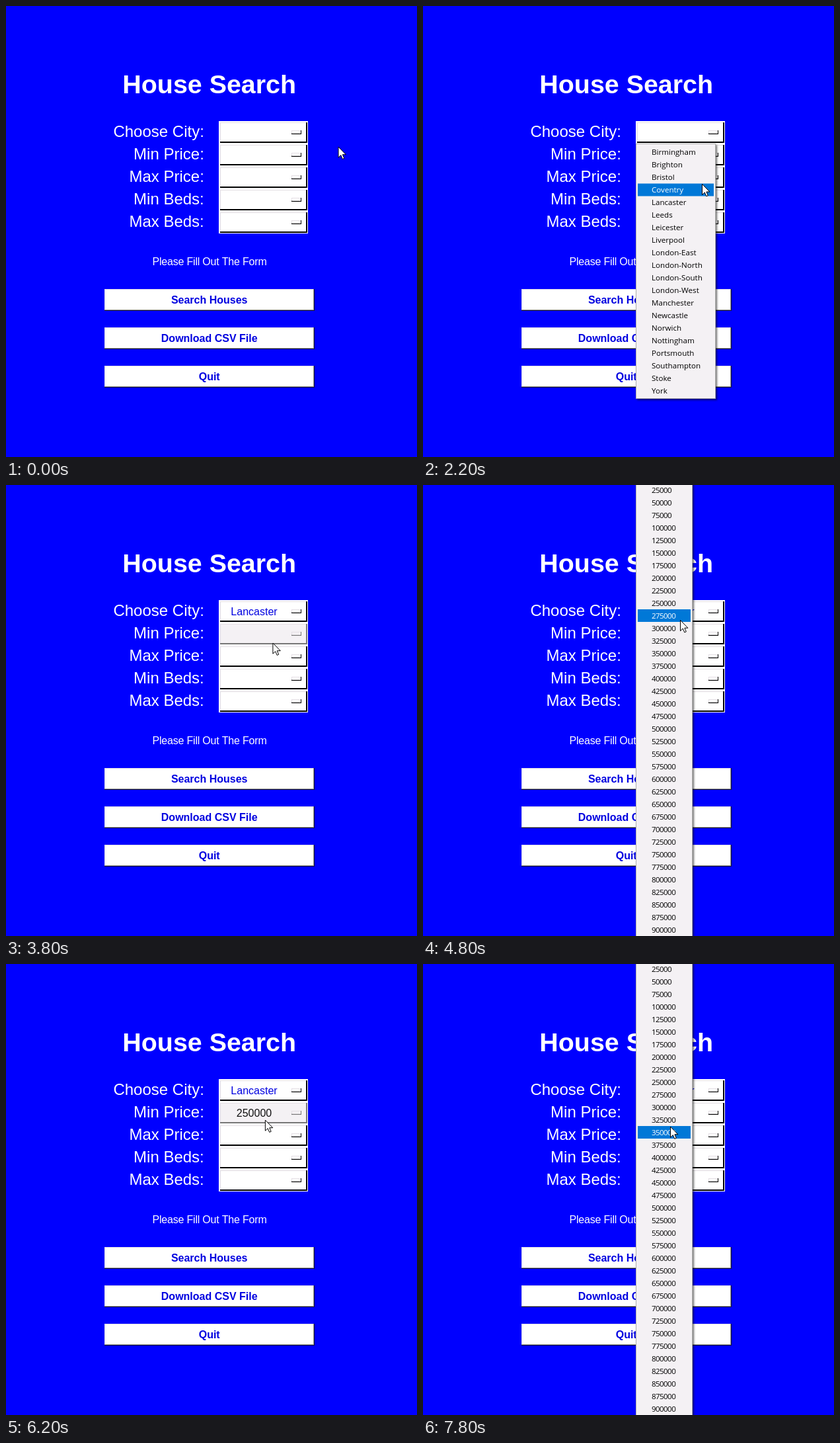
An HTML page that plays this animation: 622 px wide and 682 px high, repeating every 8000 ms.

```html
<!DOCTYPE html>
<html lang="en">
<head>
<meta charset="utf-8">
<title>House Search</title>
<style>
  html, body { margin: 0; width: 100%; height: 100%; overflow: hidden; background: #00f; }
  svg { display: block; width: 622px; height: 682px; font-family: "Liberation Sans", Arial, sans-serif; font-kerning: none; cursor: default; }
  .title { font-size: 39.4px; font-weight: bold; fill: #fff; text-anchor: middle; }
  .label { font-size: 24px; fill: #fff; text-anchor: end; }
  .status { font-size: 16px; letter-spacing: -.2px; fill: #fff; text-anchor: middle; }
  .button { font-size: 16px; font-weight: bold; fill: #0000e0; text-anchor: middle; }
  .value { font-size: 16px; fill: #0000e0; text-anchor: middle; }
  .face { fill: #fff; }
  .edge { fill: #000; }
  .hover .face { fill: #f4f1f4; }
  .hover .edge { fill: #777; }
  .hover .value { fill: #111; }
  .panel { fill: #f4f1f4; stroke: #b0b0b0; filter: drop-shadow(2px 2px 1.5px rgba(0, 0, 0, .55)); }
  .item { font: 11.6px "Open Sans", "Noto Sans", sans-serif; fill: #000; }
  .digits { letter-spacing: -.6px; }
  .bar { fill: none; }
  .active .bar { fill: #0078d7; }
  .active .item { fill: #fff; }
</style>
</head>
<body>
<svg id="stage" viewBox="0 0 622 682"></svg>
<script>
const STEP = 200, STEPS = 40, ROW = 34, ITEM = 19;
const stage = document.getElementById('stage');

function add(parent, tag, attrs, content) {
  const el = document.createElementNS('http://www.w3.org/2000/svg', tag);
  for (const name in attrs) el.setAttribute(name, attrs[name]);
  if (content) el.textContent = content;
  return parent.appendChild(el);
}
const rect = (parent, x, y, width, height, attrs) =>
  add(parent, 'rect', { x, y, width, height, ...attrs });
const text = (parent, x, y, cls, content) =>
  add(parent, 'text', { x, y, class: cls }, content);
const show = (el, on) => { el.style.display = on ? '' : 'none'; };

text(stage, 307.7, 132, 'title', 'House Search');
text(stage, 308, 392, 'status', 'Please Fill Out The Form');

['Search Houses', 'Download CSV File', 'Quit'].forEach((name, i) => {
  const y = 428 + 58 * i;
  rect(stage, 149, y, 318, 33, { fill: '#101030' });
  rect(stage, 149, y, 317, 32, { fill: '#a0a0a0' });
  rect(stage, 149, y, 316, 31, { fill: '#e4e0e8' });
  rect(stage, 150, y + 1, 315, 30, { fill: '#fff' });
  text(stage, 307.7, y + 22, 'button', name);
});

const fields = ['Choose City:', 'Min Price:', 'Max Price:', 'Min Beds:', 'Max Beds:'].map((name, i) => {
  const y = 174 + ROW * i;
  text(stage, 299.8, y + 24, 'label', name);
  rect(stage, 322, y, 135, ROW, { fill: '#fff' });
  const group = add(stage, 'g', {});
  rect(group, 324, y + 2, 132, 31, { class: 'edge' });
  rect(group, 324, y + 2, 130, 29, { fill: '#e4dfe4' });
  rect(group, 325, y + 3, 129, 28, { class: 'face' });
  rect(group, 432, y + 14, 15, 6, { class: 'edge' });
  rect(group, 432, y + 14, 14, 4.6, { fill: '#e4dfe4' });
  rect(group, 433, y + 15, 13, 3.6, { class: 'face' });
  return { group, value: text(group, 375.5, y + 23, 'value', '') };
});

function makeMenu(top, panelTop, width, height, names, cls) {
  const group = add(stage, 'g', {});
  const panel = rect(group, 322.5, panelTop, width, height, { class: 'panel' });
  const items = names.map((name, i) => {
    const y = top + ITEM * i, item = add(group, 'g', {});
    rect(item, 325, y, width - 5, ITEM, { class: 'bar' });
    text(item, 346, y + 13.8, 'item ' + cls, name);
    return item;
  });
  return { group, panel, items, top, right: 322 + width };
}

const cities = ['Birmingham', 'Brighton', 'Bristol', 'Coventry', 'Lancaster', 'Leeds', 'Leicester',
  'Liverpool', 'London-East', 'London-North', 'London-South', 'London-West', 'Manchester', 'Newcastle',
  'Norwich', 'Nottingham', 'Portsmouth', 'Southampton', 'Stoke', 'York'];
const prices = Array.from({ length: 36 }, (_, i) => String(25000 * (i + 1)));
const cityMenu = makeMenu(211.5, 208.5, 120, 385, cities, '');
const priceMenu = makeMenu(-2, -10, 85, 710, prices, 'digits');

const pointer = add(stage, 'path', {
  d: 'M0 0V16.2L3.8 12.6L6.3 18.4L8.8 17.3L6.4 11.7H11.4Z',
  fill: '#fff', stroke: '#000', 'stroke-width': 1
});

// Each session: menu, steps when it opens and closes, chosen item, fade strength
const sessions = [
  { menu: cityMenu, open: 5, close: 15, pick: 4, fade: .5 },
  { menu: priceMenu, open: 20, close: 28, pick: 9, fade: .86 },
  { menu: priceMenu, open: 33, close: STEPS }
];

// Pointer path: step, x, y
const path = [[0, 503, 213], [4, 450, 195], [6, 450, 195], [13, 411.5, 299], [15, 411.5, 299],
  [20, 402, 224], [21, 402, 224], [27, 377, 185], [28, 377, 185], [32, 397.5, 253],
  [33, 397.5, 253], [39, 374.5, 246], [40, 374.5, 246]];

function pointerAt(step) {
  const i = path.findIndex(p => p[0] > step);
  const [s0, x0, y0] = path[i - 1], [s1, x1, y1] = path[i];
  const k = (step - s0) / (s1 - s0);
  return [x0 + (x1 - x0) * k, y0 + (y1 - y0) * k];
}

function render(step) {
  const [x, y] = pointerAt(step);
  pointer.setAttribute('transform', `translate(${x} ${y})`);

  const open = sessions.find(s => step >= s.open && step < s.close);
  const fading = sessions.find(s => step === s.close);
  const current = open || fading;

  for (const menu of [cityMenu, priceMenu]) {
    show(menu.group, current && current.menu === menu);
    show(menu.panel, !fading);
    menu.group.setAttribute('opacity', fading ? fading.fade : 1);
  }

  let overMenu = false;
  if (current) {
    const { menu } = current;
    const index = Math.floor((y + 2 - menu.top) / ITEM);
    overMenu = !!open && x < menu.right && index >= 0;
    const active = fading ? fading.pick : overMenu && step > open.open ? index : -1;
    menu.items.forEach((item, i) => {
      item.setAttribute('class', i === active ? 'active' : '');
      show(item, !fading || i === active);
    });
  }

  const row = x < 456 && !overMenu ? Math.floor((y - 174) / ROW) : -1;
  fields.forEach((f, i) => f.group.setAttribute('class', i === row ? 'hover' : ''));
  fields[0].value.textContent = step >= sessions[0].close ? cities[sessions[0].pick] : '';
  fields[1].value.textContent = step >= sessions[1].close ? prices[sessions[1].pick] : '';
}

function tick() {
  render(Math.floor(performance.now() / STEP) % STEPS);
  requestAnimationFrame(tick);
}
tick();
</script>
</body>
</html>
```
